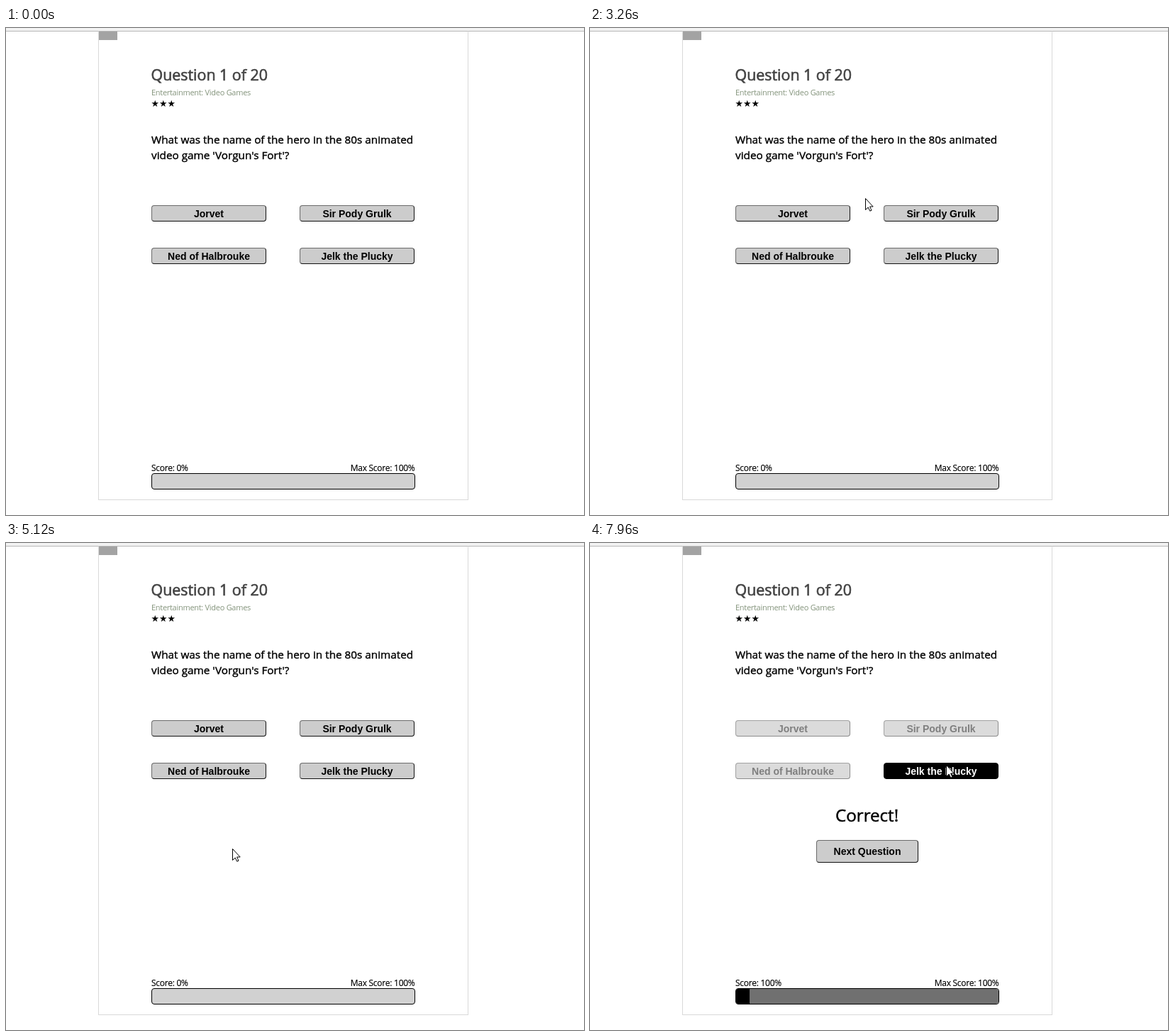
Recreate the animation shown at these times as an HTML page. Size 815 px wide and 687 px high, loop 8 s.

```html
<!DOCTYPE html>
<html lang="en">
<head>
<meta charset="utf-8">
<title>Quiz</title>
<style>
  html, body { margin: 0; width: 100%; height: 100%; overflow: hidden; background: #fff; }
  div, svg { position: absolute; box-sizing: border-box; }
  svg { left: 0; top: 0; }
  text { font-family: "Open Sans", "Noto Sans", sans-serif; white-space: pre; }
  .strip { left: 0; top: 0; width: 100%; height: 5px; background: #f2f2f2; border-bottom: 1px solid #b8b8b8; }
  .panel { left: 130px; top: 4px; width: 522px; height: 662px; border: 1px solid #d9d9d9; border-top-color: #b8b8b8; }
  .tab { left: 131px; top: 5px; width: 26px; height: 12px; background: #a3a3a3; }
  .btn {
    display: flex; align-items: center; justify-content: center;
    width: 162px; height: 23px; background: #ccc; color: #000;
    border: 1px solid; border-color: #6a6a6a #111 #111 #6a6a6a; border-radius: 4px;
    font: bold 14px "Liberation Sans", Arial, sans-serif; white-space: nowrap;
  }
  .hover { background: #999; }
  .off { background: #dbdbdb; color: #7f7f7f; border-color: #a2a2a2 #8c8c8c #8c8c8c #a2a2a2; }
  .chosen { background: #000; color: #fff; border-color: #000; }
  .next { left: 319px; top: 419px; width: 144px; height: 32px; }
  .bar { left: 205px; top: 628px; width: 372px; height: 23px; background: #d1d1d1; border: 1px solid #000; border-radius: 4px; overflow: hidden; }
  .bar div { left: 0; top: 0; height: 100%; }
  #max { background: #707070; }
  #got { background: #000; }
</style>
</head>
<body>
<div class="strip"></div>
<div class="panel"></div>
<div class="tab"></div>
<div id="answers"></div>
<div class="btn next result">Next Question</div>
<div class="bar"><div id="max"></div><div id="got"></div></div>
<svg width="815" height="687">
  <g id="copy">
    <text x="204.5" y="73.7" font-size="21.4" fill="#444" stroke="#444" stroke-width=".65">Question 1 of 20</text>
    <text x="205" y="95" font-size="11" letter-spacing="-.28" fill="#84947c">Entertainment: Video Games</text>
    <text x="204.5" y="110.5" font-size="12.8" style="font-family:'DejaVu Sans',sans-serif">★★★</text>
    <g font-size="15.3" stroke="#000" stroke-width=".4">
      <text x="205" y="163">What was the name of the hero in the 80s animated</text>
      <text x="205" y="185">video game 'Vorgun's Fort'?</text>
    </g>
  </g>
  <text class="result" x="390.5" y="393" font-size="24.2" text-anchor="middle" stroke="#000" stroke-width=".45">Correct!</text>
  <g font-size="12" letter-spacing="-.25" stroke="#000" stroke-width=".15">
    <text id="score" x="205" y="625"></text>
    <text x="576.5" y="625" text-anchor="end">Max Score: 100%</text>
  </g>
  <path id="arrow" d="M-.5 -.5V15.5L3.2 12 5.7 17.2 8 16.2 5.6 11H10.2Z" fill="#fff" stroke="#000"/>
  <path id="beam" d="M-3 -7.5H-1L0 -6.5 1 -7.5H3M0 -6.5V6.5M-3 7.5H-1L0 6.5 1 7.5H3" fill="none" stroke="#222"/>
</svg>
<script>
const LOOP = 8000, START = 320, STEP = 69.4, CLICK = 93, RIGHT = 3;
const $ = id => document.getElementById(id);
const results = document.querySelectorAll(".result");
const copy = [...$("copy").querySelectorAll("text")];

const answers = ["Jorvet", "Sir Pody Grulk", "Ned of Halbrouke", "Jelk the Plucky"].map((name, i) => {
  const el = $("answers").appendChild(document.createElement("div"));
  el.className = "btn";
  el.textContent = name;
  el.style.left = 205 + 209 * (i % 2) + "px";
  el.style.top = 250 + 60 * (i >> 1) + "px";
  return el;
});

// stops of the pointer: step, x, y
const stops = [
  [0, 780, 672], [11, 190, 53],                               // enter
  [17, 386, 66], [21, 264, 58], [24, 200, 84],                // read the heading
  [29, 366, 98], [34, 198, 150], [42, 389, 241],              // read the question
  [50, 290, 262], [57, 490, 262], [60, 453, 320], [65, 290, 322], // try the answers
  [71, 330, 470], [78, 480, 636], [81, 455, 516],             // wander
  [86, 477, 319], [105, 477, 319], [110, 503, 314]            // choose
];

function pointer(step) {
  const i = Math.max(1, stops.findIndex(s => s[0] >= step));
  const [from, x0, y0] = stops[i - 1], [to, x1, y1] = stops[i];
  const u = Math.max(0, (step - from) / (to - from)), f = u * u * (3 - 2 * u);
  return [Math.round(x0 + (x1 - x0) * f), Math.round(y0 + (y1 - y0) * f)];
}

function over(el, [x, y]) {
  const r = el.getBoundingClientRect();
  return x >= r.left && x < r.right && y >= r.top && y < r.bottom;
}

// cubic-bezier(.25, .1, .25, 1)
function ease(u) {
  if (u <= 0 || u >= 1) return u <= 0 ? 0 : 1;
  const curve = (s, a, b) => 3 * a * s * (1 - s) ** 2 + 3 * b * s * s * (1 - s) + s ** 3;
  let lo = 0, hi = 1;
  for (let i = 0; i < 20; i++) {
    const mid = (lo + hi) / 2;
    if (curve(mid, .25, .25) < u) lo = mid; else hi = mid;
  }
  return curve(lo, .1, 1);
}

function show(el, on) { el.style.visibility = on ? "visible" : "hidden"; }

function draw(t) {
  const step = Math.min(110, Math.floor((t - START) / STEP));
  const clicked = step >= CLICK, visible = step >= 0;
  const pos = pointer(step);
  const onText = copy.some(el => over(el, pos));

  show($("arrow"), visible && !onText);
  show($("beam"), visible && onText);
  for (const id of ["arrow", "beam"]) $(id).setAttribute("transform", `translate(${pos})`);

  answers.forEach((el, i) => {
    const hover = visible && over(el, pos);
    el.className = "btn " + (clicked ? (i === RIGHT ? "chosen" : "off") : hover ? "hover" : "");
  });
  results.forEach(el => show(el, clicked));
  $("score").textContent = `Score: ${clicked ? 100 : 0}%`;

  const grow = ease((START + step * STEP - 6800) / 600);
  $("max").style.width = 370 * grow + "px";
  $("got").style.width = 18.5 * grow + "px";
}

function tick() {
  draw(performance.now() % LOOP);
  requestAnimationFrame(tick);
}
tick();
</script>
</body>
</html>
```
